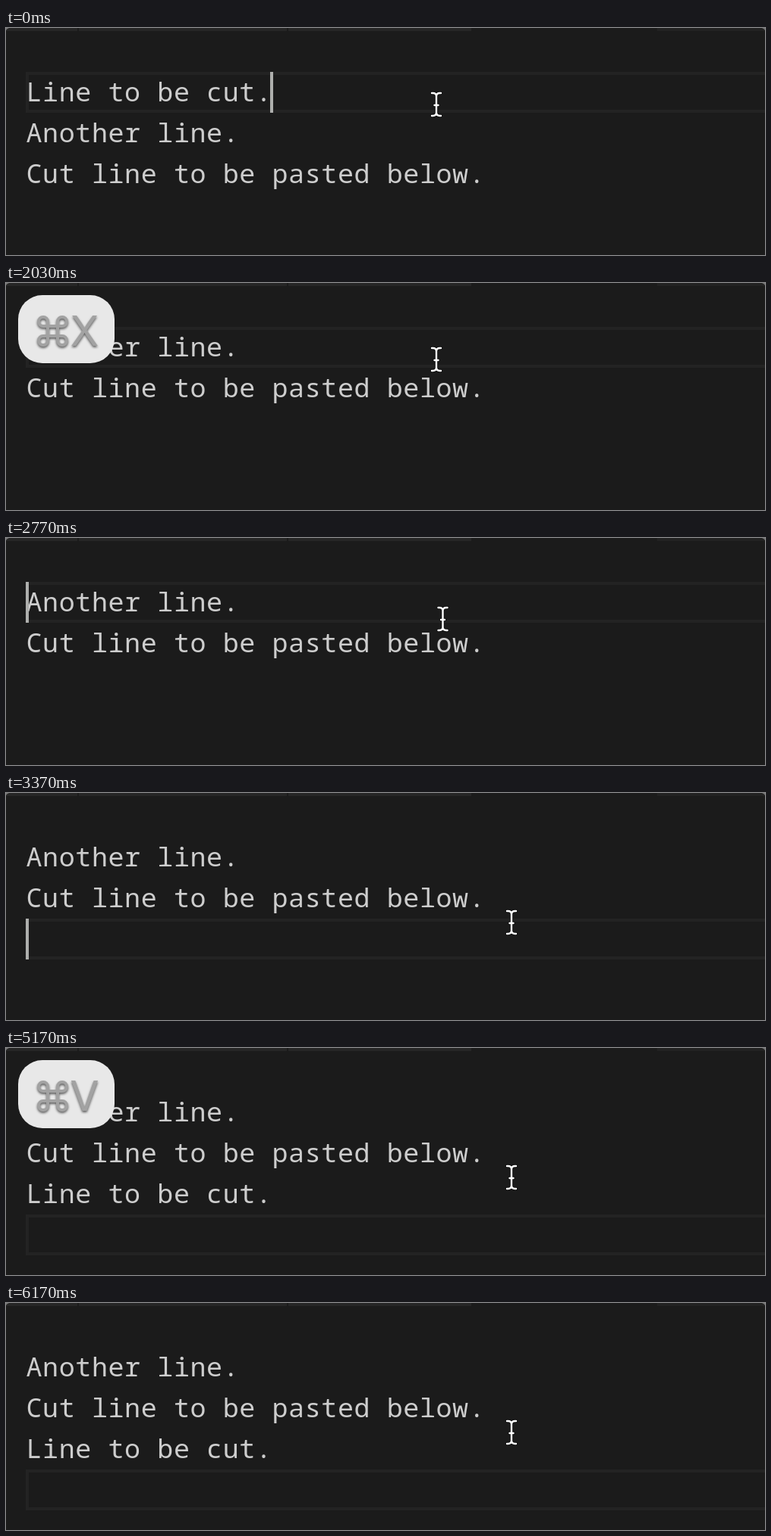
Write an HTML page that moves like this. It is 1000 px wide and 300 px high and loops after 6.26 s.

```html
<!DOCTYPE html>
<html lang="en">
<head>
<meta charset="utf-8">
<title>Cut and paste a line</title>
<style>
  html, body { margin: 0; width: 100%; height: 100%; overflow: hidden; background: #1b1b1b; }
  svg { display: block; width: 100vw; height: 100vh; }
  .code { font: 35px "Noto Sans Mono", monospace; letter-spacing: .6px; fill: #cdcdcd; }
  #keys { filter: drop-shadow(0 2px 1.5px rgba(0, 0, 0, .6)); }
  #letter { font: 55px Inter, sans-serif; fill: #a2a2a2; text-anchor: middle; }
</style>
</head>
<body>
<svg viewBox="0 0 1000 300">
  <path fill="#262626" d="M0 0H94V4H0zM96 0H370V4H96zM372 0H613V4H372z"/>
  <path fill="#222" d="M858 0H1000V4H858z"/>
  <path fill="#777" d="M0 0H4Q1 1 0 3zM1000 0H996Q999 1 1000 3z"/>
  <rect id="row" x="28" width="990" height="50" fill="none" stroke="#232323" stroke-width="4"/>
  <g class="code">
    <text x="26.5" y="97"></text>
    <text x="26.5" y="151"></text>
    <text x="26.5" y="205"></text>
  </g>
  <rect id="caret" width="4" height="54" fill="#aeafad"/>
  <g id="mouse" fill="none" stroke-linecap="round">
    <path id="beam" d="M-6-15H-4.5Q0-15 0-10.5V10.5Q0 15-4.5 15H-6M6-15H4.5Q0-15 0-10.5M0 10.5Q0 15 4.5 15H6M-2.5 1H2.5"/>
  </g>
  <rect id="badge" x="16" y="16" width="127" height="90" rx="32" fill="#e8e8e8"/>
  <g id="keys">
    <path fill="none" stroke="#a2a2a2" stroke-width="4" d="M55 57H68V70H55z
      M55 57H49A6 6 0 1 1 55 51zM68 57V51A6 6 0 1 1 74 57z
      M68 70H74A6 6 0 1 1 68 76zM55 70V76A6 6 0 1 1 49 70z"/>
    <text id="letter" x="103.5" y="83"></text>
  </g>
</svg>
<script>
const LOOP = 6260, CUT = 1530, CLICK = 3330, PASTE = 4670;
const BLINK_STARTS = [-100, CUT, CLICK, PASTE];
const $ = id => document.getElementById(id);
const lines = document.querySelectorAll('.code text');
const [first, second, third] = ['Line to be cut.', 'Another line.', 'Cut line to be pasted below.'];

const set = (node, attrs) => {
  for (const name in attrs) node.setAttribute(name, attrs[name]);
};
const clamp = v => Math.max(0, Math.min(1, v));

// The pointer is a white beam on top of a wider dark one.
const core = $('beam').cloneNode();
set($('beam'), { stroke: '#111', 'stroke-width': 4.4 });
set(core, { id: 'core', stroke: '#fff', 'stroke-width': 2.4 });
$('mouse').append(core);

function badgeAlpha(t) {
  const age = t - (t < PASTE ? CUT : PASTE);
  if (age < 0) return 0;
  return age < 930 ? 1 : (1 - clamp((age - 905) / 230)) ** 2;
}

function draw(t) {
  const text = t < CUT ? [first, second, third]
    : t < PASTE ? [second, third, '']
    : [second, third, first];
  lines.forEach((line, i) => {
    line.textContent = text[i];
  });

  const top = 58 + 54 * (t < CLICK ? 0 : t < PASTE ? 2 : 3);
  set($('row'), { y: top + 2 });

  // The blink restarts with every edit or click.
  const since = t - BLINK_STARTS.findLast(start => start <= t);
  set($('caret'), {
    x: t < CUT ? 348 : 26,
    y: top,
    opacity: since % 1000 < 500 ? 1 : 0
  });

  const p = clamp((t - 2670) / 560), ease = p * p * (3 - 2 * p);
  set($('mouse'), { transform: `translate(${567 + 99 * ease} ${101 + 70 * ease})` });

  const opacity = badgeAlpha(t);
  set($('badge'), { opacity });
  set($('keys'), { opacity });
  $('letter').textContent = t < PASTE ? 'X' : 'V';
}

const begin = performance.now();
function tick() {
  draw((performance.now() - begin) % LOOP);
  requestAnimationFrame(tick);
}
tick();
</script>
</body>
</html>
```
